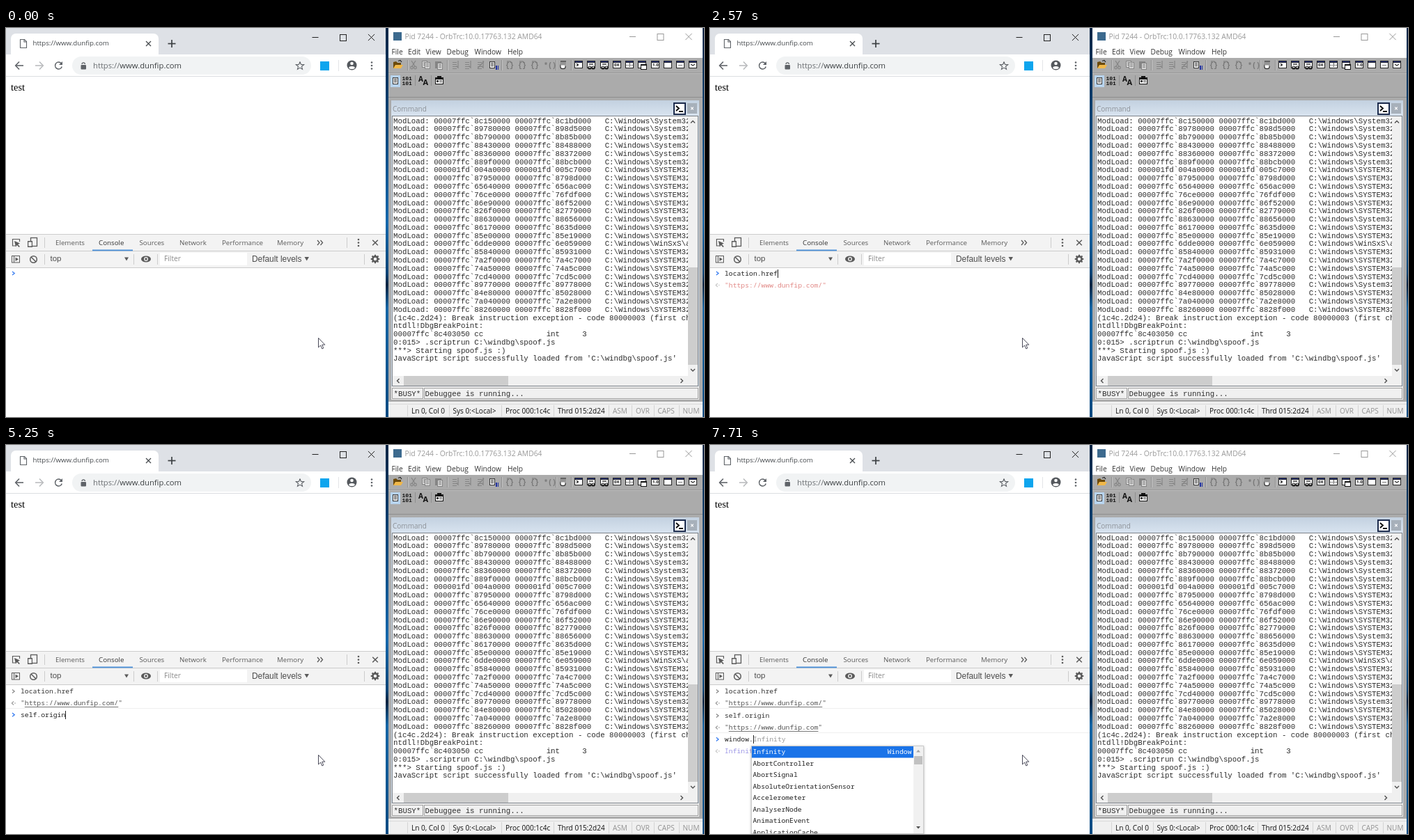
Recreate the animation shown at these times as an HTML page with a canvas. Size 1002 by 559 pixels, loop 8000 ms.

```html
<!DOCTYPE html>
<html lang="en">
<head>
<meta charset="utf-8">
<title>Console session</title>
<style>
html, body { margin: 0; width: 100%; height: 100%; overflow: hidden; background: #fff; }
canvas { display: block; }
</style>
</head>
<body>
<canvas id="stage" width="1002" height="559"></canvas>
<script>
const ctx = document.getElementById('stage').getContext('2d');
const LOOP = 8000;
const UI = '"Open Sans", sans-serif';
const ARIAL = '"Liberation Sans", sans-serif';
const MONO = '"Noto Sans Mono", monospace';
const COURIER = '"Liberation Mono", monospace';
const SITE = 'https://www.dunfip.com';
const CODE = 9.74, CHAR = CODE * 0.6, LEFT = 21;

// ---- drawing helpers ----
function rect(x, y, w, h, color) { ctx.fillStyle = color; ctx.fillRect(x, y, w, h); }
function frame(x, y, w, h, color, lw = 1) {
  ctx.strokeStyle = color; ctx.lineWidth = lw; ctx.strokeRect(x, y, w, h);
}
function round(x, y, w, h, r, color) {
  ctx.fillStyle = color; ctx.beginPath(); ctx.roundRect(x, y, w, h, r); ctx.fill();
}
function poly(points, color, lw = 1.2) {
  ctx.strokeStyle = color; ctx.lineWidth = lw; ctx.beginPath();
  for (let i = 0; i < points.length; i += 2) ctx.lineTo(points[i], points[i + 1]);
  ctx.stroke();
}
function solid(points, color) {
  ctx.fillStyle = color; ctx.beginPath();
  for (let i = 0; i < points.length; i += 2) ctx.lineTo(points[i], points[i + 1]);
  ctx.fill();
}
function ring(x, y, r, color, lw = 1.2, from = 0, to = 7) {
  ctx.strokeStyle = color; ctx.lineWidth = lw; ctx.beginPath(); ctx.arc(x, y, r, from, to); ctx.stroke();
}
function dot(x, y, r, color) { ctx.fillStyle = color; ctx.beginPath(); ctx.arc(x, y, r, 0, 7); ctx.fill(); }
function cross(x, y, r, color, lw = 1) {
  poly([x - r, y - r, x + r, y + r], color, lw);
  poly([x - r, y + r, x + r, y - r], color, lw);
}
// y is the visual middle of the line
function text(s, x, y, size, color, font = UI, weight = '') {
  ctx.font = `${weight} ${size}px ${font}`;
  ctx.fillStyle = color;
  ctx.fillText(s, x, y + size * 0.34);
}
function code(s, x, y, color, weight) { text(s, x, y, CODE, color, MONO, weight); }
function chevron(x, y, color, r = 2.6) { poly([x, y - r, x + r + 0.6, y, x, y + r], color, 1.3); }
function dots(x, y, color) { for (const d of [-4.5, 0, 4.5]) dot(x, y + d, 1.3, color); }
function windowButtons(right, y, color) {
  poly([right - 105.5, y + 0.5, right - 96.5, y + 0.5], color, 1);
  frame(right - 65.5, y - 4 + 0.5, 9, 9, color);
  cross(right - 20.5, y + 0.5, 4.6, color);
}

// ---- browser ----
function drawBrowser() {
  rect(0, 0, 545, 559, '#fff');
  rect(0, 0, 545, 38, '#dee1e6');
  round(7, 8, 212, 36, 7, '#fff');
  rect(0, 38, 545, 32, '#fff');
  poly([21.5, 16.5, 26.5, 16.5, 29.5, 19.5, 29.5, 28.5, 20.5, 28.5, 20.5, 16.5, 26, 16.5, 26, 20, 29, 20], '#5f6368', 1.1);
  text(SITE, 38.5, 22, 9.7, '#45494d');
  cross(204.5, 22.5, 3.5, '#45494d', 1.2);
  poly([232.5, 22.5, 243.5, 22.5], '#3c4043', 1.7);
  poly([238, 17, 238, 28], '#3c4043', 1.7);
  windowButtons(545, 13, '#222');

  poly([25, 54, 14, 54], '#5f6368', 1.6); poly([19, 48.5, 13.7, 54, 19, 59.5], '#5f6368', 1.6);
  poly([42, 54, 53, 54], '#babcbe', 1.6); poly([48, 48.5, 53.3, 54, 48, 59.5], '#babcbe', 1.6);
  ring(75.5, 54, 4.9, '#5f6368', 1.6, 0.3, 5.5);
  solid([81, 48, 81, 53, 76, 53], '#5f6368');
  round(95, 41, 343, 26, 13, '#f1f3f4');
  round(107.5, 53, 7.5, 6.5, 1, '#5f6368');
  ring(111.2, 52, 2.2, '#5f6368', 1.2, Math.PI, 2 * Math.PI);
  text('https://', 125, 54, 11.25, '#6b6f73');
  text(SITE.slice(8), 125 + ctx.measureText('https://').width, 54, 11.25, '#3c4043');
  const star = [];
  for (let i = 0; i <= 10; i++) {
    const a = i * Math.PI / 5 - Math.PI / 2, r = i % 2 ? 2.6 : 6;
    star.push(422 + r * Math.cos(a), 54.5 + r * Math.sin(a));
  }
  poly(star, '#5f6368', 1.1);
  rect(451, 48, 13, 13, '#0ea5ee');
  rect(477, 46, 1, 16, '#e3e5e8');
  dot(496.5, 53.5, 7, '#54585d'); dot(496.5, 51, 2.3, '#fff');
  ctx.fillStyle = '#fff'; ctx.beginPath(); ctx.ellipse(496.5, 57, 4.2, 2, 0, 0, 7); ctx.fill();
  dots(525, 54, '#5f6368');
  rect(0, 69, 545, 1, '#dcdee1');
  text('test', 7, 85, 14.4, '#000', '"Liberation Serif", serif');
}

function drawDevtools() {
  rect(0, 296, 545, 48, '#f3f3f3');
  for (const y of [296, 320, 344]) rect(0, y, 545, 1, '#ccc');
  const ink = '#5a5a5a';
  poly([14, 313, 9.5, 313, 9.5, 303.5, 19.5, 303.5, 19.5, 307], ink);
  solid([12, 306, 20, 309.5, 17, 311, 20, 314, 18.5, 315, 15.8, 312, 14, 314.5], ink);
  frame(35.5, 301.5, 9, 12, ink, 1.3); rect(31, 306, 7, 9, ink); rect(32.2, 307.5, 4.6, 6, '#f3f3f3');
  rect(55, 301, 1, 15, '#ccc');
  const tabs = [['Elements', 71], ['Console', 133], ['Sources', 191.5], ['Network', 249], ['Performance', 310], ['Memory', 389]];
  for (const [name, x] of tabs) text(name, x, 309, 9.75, name === 'Console' ? '#333' : '#5a5a5a');
  rect(124, 318.5, 58, 1.8, '#4a90d9');
  for (const x of [447, 451.5]) poly([x, 305, x + 3, 308.5, x, 312], ink, 1.3);
  rect(489, 301, 1, 15, '#ccc');
  dots(506, 308.5, ink);
  cross(530, 308.5, 3.8, ink, 1.5);

  frame(8.5, 327.5, 11, 9.5, ink); rect(11, 328, 1, 9, ink);
  solid([13.5, 329.5, 18, 332.3, 13.5, 335], ink);
  ring(39.5, 332.5, 4.8, ink, 1.5); poly([36, 329, 43, 336], ink, 1.5);
  rect(55, 325, 1, 15, '#ccc'); rect(183, 325, 1, 15, '#ccc');
  text('top', 63.5, 331.5, 11.4, '#4c4c4c', ARIAL);
  solid([170, 329.5, 176, 329.5, 173, 334.5], ink);
  ctx.fillStyle = ink; ctx.beginPath(); ctx.ellipse(201, 332, 7, 4.6, 0, 0, 7); ctx.fill();
  dot(201, 332, 3, '#f3f3f3'); dot(201, 332, 1.7, ink);
  rect(217, 325, 1, 15, '#ccc');
  rect(221, 323, 125, 18, '#fff');
  text('Filter', 227, 332, 10.2, '#8a8a8a');
  text('Default levels', 353, 331.5, 11.9, '#4c4c4c', ARIAL);
  solid([428.5, 329, 435, 329, 431.7, 334.5], ink);
  rect(514, 325, 1, 15, '#ccc');
  ring(530, 332, 3.6, ink, 2.6);
  for (let i = 0; i < 8; i++) {
    const a = i * Math.PI / 4, c = Math.cos(a), s = Math.sin(a);
    poly([530 + 4 * c, 332 + 4 * s, 530 + 6.3 * c, 332 + 6.3 * s], ink, 2);
  }
}

// ---- debugger ----
const modules = `8c150000 8c1bd000,89780000 898d5000,8b790000 8b85b000,88430000 88488000,88360000 88372000,
889f0000 88bcb000,004a0000 005c7000,87950000 8798d000,65640000 656ac000,76ce0000 76fdf000,86e90000 86f52000,
826f0000 82779000,88630000 88656000,86170000 8635d000,85e00000 85e19000,6dde0000 6e059000,85840000 85931000,
7a2f0000 7a4c7000,74a50000 74a5c000,7cd40000 7cd5c000,89770000 89778000,84e80000 85028000,7a040000 7a2e8000,
88260000 8828f000`.split(/,\s*/);
const output = modules.map((pair, i) => {
  const base = i === 6 ? '000001fd`' : '00007ffc`';
  const dir = i === 15 ? 'WinSxS\\amd64' : i < 6 || i === 12 || i === 20 ? 'System32\\' : 'SYSTEM32\\';
  return `ModLoad: ${pair.split(' ').map(a => base + a).join(' ')}   C:\\Windows\\${dir}`;
}).concat([
  '(1c4c.2d24): Break instruction exception - code 80000003 (first chance)',
  'ntdll!DbgBreakPoint:',
  '00007ffc`8c403050 cc              int     3',
  '0:015> .scriptrun C:\\windbg\\spoof.js',
  '***> Starting spoof.js :)',
  "JavaScript script successfully loaded from 'C:\\windbg\\spoof.js'"
]);

function page(x, y, color, paper = '#d8d8d8') {
  rect(x - 4, y - 5, 8, 10, color); rect(x - 3, y - 4, 6, 8, paper);
  for (const d of [-3, -1, 1]) rect(x - 2, y + d, 4, 1, color);
}

function drawToolbar() {
  rect(549, 43, 451, 494, '#ababab');
  rect(549, 64, 451, 1, '#9a9a9a'); rect(549, 65, 451, 1, '#bcbcbc');
  rect(549, 99, 451, 1, '#8d8d8d');
  const dim = '#858585';
  solid([556, 49, 560, 48, 562, 50, 567, 50, 567, 58, 556, 58], '#6b4a0c');
  solid([559, 53, 570, 53, 567, 58, 556, 58], '#f0b84a');
  poly([563, 47.5, 566, 46.5, 568, 49], '#222');
  for (const x of [576, 633, 711, 789, 811]) { rect(x, 46, 1, 15, '#8f8f8f'); rect(x + 1, 46, 1, 15, '#c4c4c4'); }
  poly([582, 47, 587, 55], dim); poly([588, 47, 583, 55], dim); ring(582.5, 57, 1.8, dim); ring(587.5, 57, 1.8, dim);
  page(601, 52, dim); page(605, 54, dim);
  rect(616, 48, 9, 10, dim); page(623, 55, dim);
  for (const x of [645, 663, 681]) {
    for (const y of [49, 52, 55, 58]) rect(x - 4, y, 6, 1, dim);
    poly([x + 4, 47, x + 4, 57, x + 1.5, 54.5], dim);
  }
  poly([677, 58, 686, 48], dim);
  page(698, 53, '#333', '#fff'); rect(703, 54, 2, 6, '#1c2ea0'); rect(706, 54, 1, 6, '#1c2ea0');
  [722, 740, 758, 777].forEach((x, i) => {
    text(i === 3 ? '*()' : '{}', x - 5, 54, 10, '#777', COURIER, 'bold');
    if (i < 3) poly([x - 3, 48, x + 2, 48, x + 4, 50], '#777');
  });
  round(795.5, 51, 8, 8, 3, '#111'); round(796.5, 52, 6, 6, 2, '#fff');
  for (let i = 0; i < 4; i++) { rect(796 + i * 2, 47.5, 2, 6, '#111'); rect(796.5 + i * 2, 48.3, 1.1, 6, '#fff'); }
  for (let i = 0; i < 10; i++) {
    const x = Math.round(822 + i * 18.25);
    rect(x - 6, 47, 12, 11, '#222'); rect(x - 5, 50, 10, 7, '#fff'); rect(x - 5, 48, 10, 1, '#26358c');
    if (i === 0) chevron(x - 3, 53, '#111', 1.7);
    else if (i === 1 || i === 2) { ring(x - 2, 57, 2, '#111'); ring(x + 3, 57, 2, '#111'); poly([x - 3, 52, x + 3, 52], '#111'); }
    else if (i === 3) text('0X', x - 4, 53.3, 6, '#111', UI, 'bold');
    else if (i === 4) { rect(x, 50, 1, 6, '#555'); rect(x - 5, 53, 10, 1, '#999'); }
    else if (i === 5) { rect(x - 2, 52, 9, 8, '#111'); rect(x - 1, 54, 7, 5, '#fff'); }
    else if (i === 6) text('1.0', x - 4, 53.3, 6, '#111', UI, 'bold');
    else if (i === 8) rect(x - 3, 53, 6, 1, '#777');
    else if (i === 9) poly([x - 3, 52, x, 54, x + 3, 52], '#333');
  }
  rect(552, 68, 14, 17, '#b8d4ee'); page(559, 76, '#333', '#fff');
  text('101', 568.5, 72.5, 8, '#111', COURIER, 'bold'); text('101', 568.5, 79.5, 8, '#111', COURIER, 'bold');
  rect(587, 68, 1, 15, '#8f8f8f'); rect(610, 68, 1, 15, '#8f8f8f');
  text('A', 592, 74, 10, '#111', UI, 'bold'); text('A', 598.5, 78, 11, '#111', UI, 'bold');
  rect(616, 71, 12, 10, '#111'); rect(617, 74, 10, 6, '#fff'); rect(619, 69, 6, 4, '#111');
  rect(618, 75, 3, 3, '#333'); rect(622, 75, 4, 1, '#555'); rect(622, 77, 4, 1, '#555');
}

function arrow(x, y, dx, dy, color = '#505050') {
  poly([x - 3 * dy - 1.5 * dx, y - 3 * dx - 1.5 * dy, x + 1.5 * dx, y + 1.5 * dy, x + 3 * dy - 1.5 * dx, y + 3 * dx - 1.5 * dy], color, 1.4);
}

function drawDebugger() {
  const sky = ctx.createLinearGradient(0, 0, 0, 559);
  [[0, '#0a2646'], [0.2, '#0c3f6f'], [0.5, '#1668ac'], [0.63, '#0d4577'], [0.66, '#0b2340'], [0.72, '#1666a6'], [1, '#0b4b82']]
    .forEach(([p, c]) => sky.addColorStop(p, c));
  rect(545, 0, 4, 559, sky); rect(1000, 0, 2, 559, sky);
  rect(549, 0, 451, 43, '#fff');
  rect(556, 6, 12, 12, '#3c6a8e');
  text('Pid 7244 - OrbTrc:10.0.17763.132 AMD64', 572.5, 12.5, 10.35, '#999');
  windowButtons(1000.5, 12, '#999');
  [['File', 553.5], ['Edit', 577], ['View', 602.5], ['Debug', 632.5], ['Window', 672.5], ['Help', 720]]
    .forEach(([s, x]) => text(s, x, 34.5, 10.2, '#333'));
  drawToolbar();

  rect(553, 104, 442, 430, '#d3dfeb');
  const bar = ctx.createLinearGradient(0, 104, 0, 127);
  bar.addColorStop(0, '#c3d1e0'); bar.addColorStop(1, '#d9e4f0');
  rect(553, 104, 442, 23, bar);
  text('Command', 555, 116.5, 10, '#8d9298');
  rect(958, 107, 18, 18, '#1b2a4c'); rect(960, 109, 14, 14, '#fff');
  poly([962, 112, 966, 115.5, 962, 119], '#000', 1.8); rect(966, 119, 6, 1.8, '#000');
  rect(978, 108, 14, 15, '#a7b0ba'); cross(985, 115.5, 1.8, '#fff', 1.2);

  rect(554, 126, 440, 389, '#7b8188');
  rect(555, 127, 438, 387, '#fff');
  ctx.save();
  ctx.beginPath(); ctx.rect(555, 127, 424, 373); ctx.clip();
  output.forEach((line, i) => text(line, 556, 133 + i * 11.785, 10.78, '#2c2c2c', COURIER));
  ctx.restore();
  rect(979, 127, 14, 373, '#f0f0f0'); rect(979, 344, 14, 140, '#cdcdcd');
  arrow(986, 135, 0, -1); arrow(986, 491.5, 0, 1);
  rect(555, 500, 438, 14, '#f0f0f0'); rect(571, 500, 150, 14, '#cdcdcd');
  arrow(563, 507, -1, 0); arrow(970, 507, 1, 0);
  rect(553, 515, 442, 19, '#f0f0f0');
  frame(554.5, 517.5, 44, 15, '#a0a0a0'); frame(600.5, 517.5, 393, 15, '#a0a0a0');
  text('*BUSY*', 556.5, 525, 10.78, '#2c2c2c', COURIER);
  text('Debuggee is running...', 601.5, 525, 10.78, '#2c2c2c', COURIER);
  rect(549, 537, 451, 22, '#f0f0f0'); rect(549, 540, 451, 1, '#d9d9d9');
  [['Ln 0, Col 0', 582], ['Sys 0:<Local>', 641.5], ['Proc 000:1c4c', 717], ['Thrd 015:2d24', 792],
   ['ASM', 871], ['OVR', 904], ['CAPS', 935.5], ['NUM', 971.5]].forEach(([s, x], i) => {
    text(s, x, 550.5, 10.05, i < 4 ? '#111' : '#929292');
    rect(Math.round(x - 6), 542, 1, 16, '#d4d4d4');
  });
}

// ---- completion menus ----
const globals = `location localStorage locationbar Location self sessionStorage setInterval setTimeout
SecurityPolicyViolationEvent Selection Sensor SensorErrorEvent ServiceWorker ServiceWorkerContainer screen scroll status stop
length Lock LockManager let LinearAccelerationSensor window WaveShaperNode WeakMap WeakSet WebAssembly WebGLActiveInfo
WebGLUniformLocation WebSocket WheelEvent Window Worker Worklet WritableStream while with webkitURL getSelection
HTMLSelectElement`.split(/\s+/);
const members = {
  location: `ancestorOrigins assign hash host hostname href origin pathname port protocol reload replace search toString valueOf`.split(' '),
  window: `Infinity AbortController AbortSignal AbsoluteOrientationSensor Accelerometer AnalyserNode AnimationEvent
ApplicationCache Array Attr Audio origin open opener onload onblur onerror onfocus outerHeight outerWidth`.split(/\s+/)
};
members.self = members.window;
const past = ['location.href', `location.href="${SITE}/csp_…`];

function suggest(key) {
  const [owner, member] = key.includes('.') ? key.split('.') : ['', key];
  const query = member.toLowerCase();
  const pool = owner ? members[owner] : globals;
  const at = s => s.toLowerCase().indexOf(query);
  const names = [...pool.filter(s => at(s) === 0), ...pool.filter(s => at(s) > 0)];
  return { query, names, col: key.length - query.length, history: past.filter(s => s.startsWith(key)), at,
    label: owner === 'location' ? 'Location' : 'Window' };
}

function marked(s, start, length, x, y, color) {
  const parts = [s.slice(0, start), s.slice(start, start + length), s.slice(start + length)];
  parts.forEach((part, i) => { code(part, x, y, color, i === 1 ? 'bold' : ''); x += part.length * CHAR; });
}

function drawMenu(menu, top) {
  const ROW = 16.5, x = Math.round(18 + menu.col * CHAR);
  const count = menu.names.length + menu.history.length;
  const width = menu.history.length ? 268 : 248;
  const overflow = count * ROW + 2 > 559 - top;
  const height = overflow ? 559 - top : count * ROW + 2;
  const inner = width - 2 - (overflow ? 14 : 0);
  ctx.save();
  ctx.shadowColor = 'rgba(0,0,0,.35)'; ctx.shadowBlur = 3; ctx.shadowOffsetY = 1;
  rect(x, top, width, height, '#fff');
  ctx.restore();
  frame(x + 0.5, top + 0.5, width - 1, height - 1, '#ccc');
  ctx.save();
  ctx.beginPath(); ctx.rect(x, top, width, height - 1); ctx.clip();
  for (let i = 0; i < count && i < 12; i++) {
    const y = top + 1 + i * ROW, mid = y + ROW / 2 - 0.5, old = menu.history[i - menu.names.length];
    if (old) {
      rect(x + 1, y, inner, ROW, '#f5f5f5');
      chevron(x + 5, mid, '#367cf1');
      marked(old, 0, menu.col + menu.query.length, x + 11, mid, '#222');
      continue;
    }
    if (!i) {
      rect(x + 1, y, inner, ROW, '#1a73e8');
      code(menu.label, x + inner - 1.5 - menu.label.length * CHAR, mid, '#fff');
    }
    const name = menu.names[i];
    marked(name, menu.at(name), menu.query.length, x + 2.5, mid, i ? '#222' : '#fff');
  }
  if (overflow) {
    const sx = x + width - 15;
    rect(sx, top + 1, 14, height - 2, '#f1f1f1');
    rect(sx + 1, top + 15, 12, 12, '#c1c1c1');
    solid([sx + 4, top + 9.5, sx + 10, top + 9.5, sx + 7, top + 6], '#a3a3a3');
    solid([sx + 4, 548, sx + 10, 548, sx + 7, 551.5], '#505050');
  }
  ctx.restore();
}

// ---- console session ----
const URL_TEXT = `"${SITE}/"`;
const LOCATION = `Location {replace: ƒ, assign: ƒ, href: ${URL_TEXT}, ancestorOrigins: DOM`;
const WINDOW = 'Window {postMessage: ƒ, blur: ƒ, focus: ƒ, close: ƒ, parent: Window, …}';
const log = [[2980, 354, 'location.href'], [3050, 371, URL_TEXT], [5650, 389, 'self.origin'], [5710, 406, `"${SITE}"`]];
// time, prompt ('|' is the caret), text the menu belongs to, preview
const steps = [
  [0, ''],
  [1130, 'l|', 'l'], [1230, 'lo|', 'lo'], [1340, 'loc|', 'loc'],
  [1570, 'loca|', 'loca', LOCATION], [1650, 'locat|', 'locat', LOCATION],
  [1800, 'location|', 'location', LOCATION], [1880, 'location.|', 'location', LOCATION],
  [1960, 'location.|', '', LOCATION], [2020, 'location.|', 'location.', 'DOMStringList {length: 0}'],
  [2190, 'location.h|', 'location.h', '""'], [2260, 'location.hr|', 'location.hr', URL_TEXT],
  [2340, 'location.hre|', 'location.hre', URL_TEXT], [2420, 'location.href|', 'location.href', URL_TEXT],
  [2570, 'location.href|', '', URL_TEXT],
  [2980, ''], [3050, '|'], [3510, ''],
  [3680, 's|'], [3770, 's|', 's'], [3920, 'se|', 'se'], [4270, 'sel|', 'sel'],
  [4510, 'self|', 'self'], [4580, 'self|', 'self', WINDOW], [4650, 'self.|', 'self', WINDOW],
  [4720, 'self.|', 'self.', 'Infinity'], [4800, 'self.o|', 'self.o'], [4870, 'self.or|', 'self.or'],
  [4940, 'self.ori|'], [5150, 'self.orig|'], [5250, 'self.origin|'],
  [5650, ''], [5710, '|'], [6210, ''], [6720, '|'],
  [6960, 'w|', 'w'], [7050, 'wi|', 'wi'], [7150, 'win|', 'win', WINDOW], [7240, 'wind|', 'wind', WINDOW],
  [7340, 'windo|', 'windo', WINDOW], [7560, 'window|', 'window', WINDOW], [7640, 'window.|', 'window', WINDOW],
  [7710, 'window.|', 'window.', 'Infinity']
];

function resultMark(y, color) { poly([11, y - 2.5, 8.3, y, 11, y + 2.5], color, 1.1); dot(13, y, 0.8, color); }

function drawLog(lines) {
  lines.forEach(([, y, s], i) => {
    if (i % 2 === 0) {
      chevron(9, y, '#8a8a8a'); code(s, LEFT, y, '#333');
    } else {
      resultMark(y, '#999'); code(s, LEFT, y, '#555');
      rect(LEFT + CHAR, y + 5, (s.length - 2) * CHAR, 1, '#777');
      rect(0, y + 7, 545, 1, '#efefef');
    }
  });
}

function drawPreview(s, y) {
  resultMark(y, '#c4c4c4');
  let x = LEFT;
  for (const part of s.split(/("[^"]*")/)) {
    code(part, x, y, part[0] === '"' ? '#e28a87' : part === 'Infinity' ? '#9d97e6' : '#999');
    x += part.length * CHAR;
  }
}

function drawConsole(t, [, prompt, key, preview]) {
  rect(0, 345, 545, 214, '#fff');
  const lines = log.filter(([time]) => time <= t);
  drawLog(lines);
  if (lines.length % 2 === 0) {
    const y = 352.5 + lines.length * 17.6;
    const typed = prompt.replace('|', ''), end = LEFT + typed.length * CHAR;
    const menu = key && suggest(key);
    chevron(9, y, '#367cf1');
    code(typed, LEFT, y, '#222');
    if (preview) drawPreview(preview, y + 17);
    if (menu && key === typed) code(menu.names[0].slice(menu.query.length), end, y, '#999');
    if (prompt.includes('|')) rect(Math.round(end), Math.round(y - 6), 1, 12, '#222');
    if (menu) drawMenu(menu, Math.round(y + 9.4));
  }
  const pointer = [448.5, 445.5, 448.5, 459, 451.6, 456, 453.8, 461, 455.8, 460, 453.7, 455.2, 457.8, 455.2, 448.5, 445.5];
  solid(pointer, '#fff'); poly(pointer, '#4b4b5a', 1);
}

drawBrowser();
drawDevtools();
drawDebugger();
let shown = null;
function tick() {
  const t = performance.now() % LOOP;
  const step = steps.findLast(([time]) => time <= t);
  if (step !== shown) {
    ctx.save();
    ctx.beginPath(); ctx.rect(0, 345, 545, 214); ctx.clip();
    drawConsole(t, step);
    ctx.restore();
    shown = step;
  }
  requestAnimationFrame(tick);
}
tick();
</script>
</body>
</html>
```
